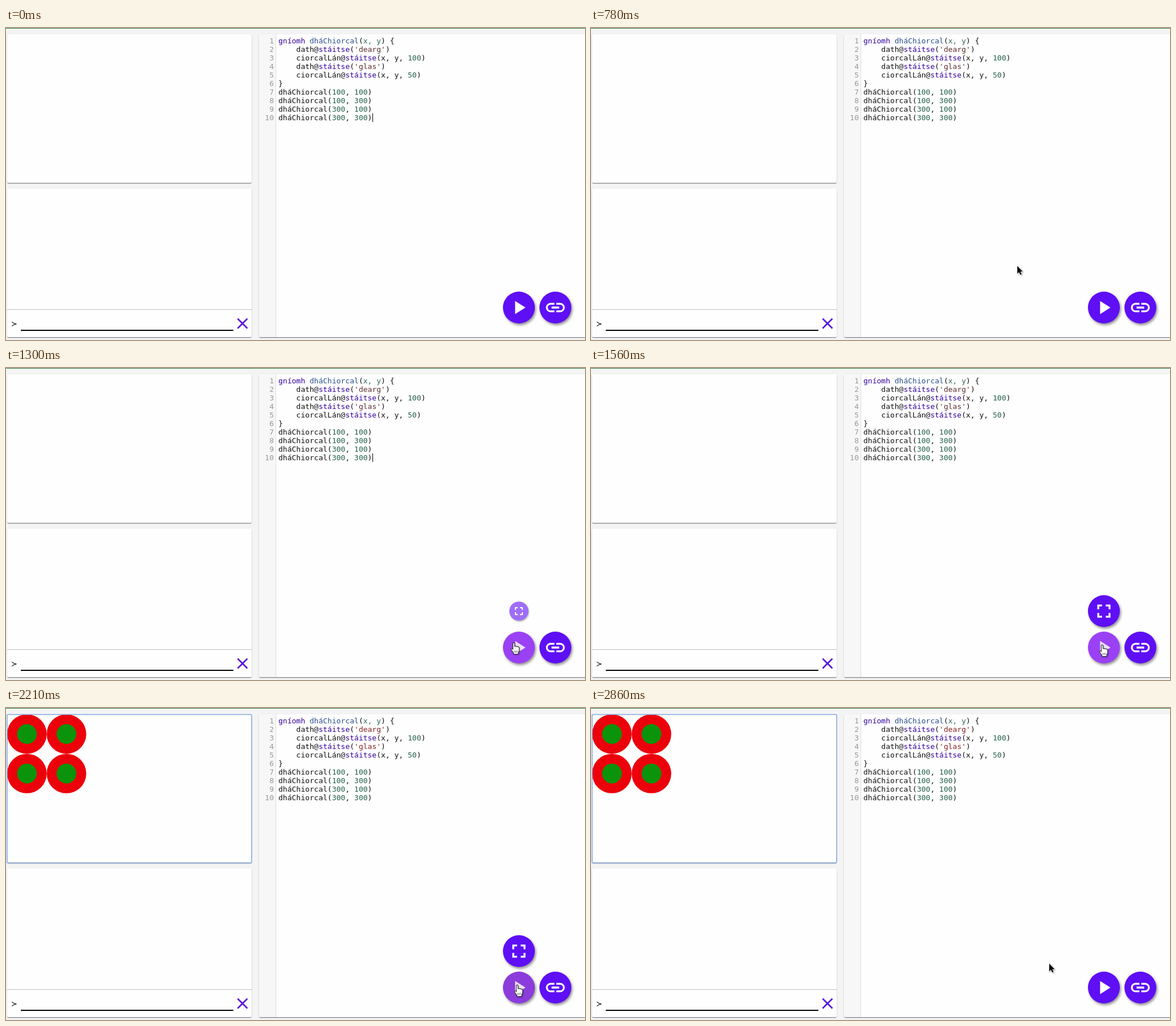
Write an HTML page that moves like this. It is 1016 by 548 pixels and loops after 3120 ms.

```html
<!DOCTYPE html>
<html lang="ga">
<head>
<meta charset="utf-8">
<title>Dhá chiorcal</title>
<style>
  html, body { margin: 0; width: 100%; height: 100%; overflow: hidden; }
  body { position: relative; background: #f4f4f4; }
  body > * { position: absolute; }
  .bar { left: 0; top: 0; width: 100%; height: 1px; background: #2e8037; }
  .panel {
    box-sizing: border-box; background: #fefefe; border-radius: 2px;
    box-shadow: 0 2px 1px -1px rgba(0,0,0,.32), 0 1px 1px rgba(0,0,0,.2), 0 1px 3px rgba(0,0,0,.14);
  }
  .stage { left: 2px; top: 11px; width: 429px; height: 261px; }
  .console { left: 2px; top: 282px; width: 429px; height: 261px; }
  .editor { left: 444px; top: 11px; width: 576px; height: 532px; overflow: hidden; }
  .gutter {
    position: absolute; left: 0; top: 0; width: 29px; height: 100%;
    background: #f7f7f7; border-right: 1px solid #ddd;
  }
  pre { margin: 0; position: absolute; top: 4px; font: 13px/15px "DejaVu Sans Mono", monospace; color: #111; }
  .nums { right: 3px; text-align: right; color: #999; }
  .code { left: 34px; }
  .kw { color: #33009c; }
  .def { color: #2a4f8c; }
  .arg { color: #35695f; }
  .num { color: #27604e; }
  .str { color: #5e2d30; }
  .ran .str { color: #86211f; }
  .caret { left: 643px; top: 150px; width: 1px; height: 15px; background: #000; }
  .prompt { left: 9px; top: 512px; font: 13px/16px "DejaVu Sans", sans-serif; color: #000; }
  svg { left: 0; top: 0; }
  .btn { filter: drop-shadow(2px 3px 2px rgba(0,0,0,.42)); }
  .btn circle { fill: #5f0ff5; }
  .btn path { fill: #fff; }
  .btn.hover circle { fill: #9b41f5; }
  .btn.press circle { fill: #8b3cdb; }
  .btn.hover path, .btn.press path { fill: #eee2fb; }
  .pointer { filter: drop-shadow(1px 1px 1px rgba(0,0,0,.35)); }
</style>
</head>
<body>
<div class="bar"></div>
<div class="panel stage"></div>
<div class="panel console"></div>
<div class="panel editor">
  <div class="gutter"><pre class="nums">1
2
3
4
5
6
7
8
9
10</pre></div>
  <pre class="code"><span class="kw">gníomh</span> <span class="def">dháChiorcal</span>(<span class="arg">x, y</span>) {
    dath@<span class="kw">stáitse</span>(<span class="str">'dearg'</span>)
    ciorcalLán@<span class="kw">stáitse</span>(x, y, <span class="num">100</span>)
    dath@<span class="kw">stáitse</span>(<span class="str">'glas'</span>)
    ciorcalLán@<span class="kw">stáitse</span>(x, y, <span class="num">50</span>)
}
dháChiorcal(<span class="num">100</span>, <span class="num">100</span>)
dháChiorcal(<span class="num">100</span>, <span class="num">300</span>)
dháChiorcal(<span class="num">300</span>, <span class="num">100</span>)
dháChiorcal(<span class="num">300</span>, <span class="num">300</span>)</pre>
</div>
<div class="caret" id="caret"></div>
<div class="prompt">≻</div>

<svg width="1016" height="548" viewBox="0 0 1016 548">
  <defs>
    <g id="target">
      <circle r="100" fill="#ec000b"/>
      <circle r="50" fill="#0b930b"/>
    </g>
  </defs>

  <path d="M2 494.5H431" stroke="#bdbdbd"/>
  <path d="M26 531H399" stroke="#000" stroke-width="2"/>
  <path d="M406.5 510.500l17 17m0-17l-17 17" stroke="#560fdc" stroke-width="2.600"/>

  <g id="drawing">
    <g transform="translate(2 11) scale(.347)">
      <use href="#target" x="100" y="100"/>
      <use href="#target" x="100" y="300"/>
      <use href="#target" x="300" y="100"/>
      <use href="#target" x="300" y="300"/>
    </g>
    <rect x="2" y="11.500" width="429" height="260.500" rx="1.500" fill="none" stroke="#84a8e2" stroke-width="1.500"/>
  </g>

  <g class="btn" id="full">
    <circle r="28"/>
    <path transform="scale(1.65) translate(-12 -12)" d="M7 14H5v5h5v-2H7v-3zm-2-4h2V7h3V5H5v5zm12 7h-3v2h5v-5h-2v3zM14 5v2h3v3h2V5h-5z"/>
  </g>
  <g class="btn" id="play" transform="translate(900 491)">
    <circle r="28"/>
    <path transform="scale(1.65) translate(-12 -12)" d="M8 5v14l11-7z"/>
  </g>
  <g class="btn" transform="translate(964 491)">
    <circle r="28"/>
    <path transform="scale(1.65) translate(-12 -12)" d="M3.900 12c0-1.710 1.390-3.100 3.100-3.100h4V7H7c-2.760 0-5 2.240-5 5s2.240 5 5 5h4v-1.900H7c-1.710 0-3.100-1.390-3.100-3.100zM8 13h8v-2H8v2zm9-6h-4v1.900h4c1.710 0 3.100 1.390 3.100 3.100s-1.390 3.100-3.100 3.100h-4V17h4c2.760 0 5-2.240 5-5s-2.240-5-5-5z"/>
  </g>

  <g class="pointer" id="arrow">
    <path d="M0 0V13.500L3.100 10.700L5.300 15.600L7.600 14.600L5.500 9.800H9.600Z" fill="#0a0a0a" stroke="#fff" stroke-width="1.200" paint-order="stroke"/>
  </g>
  <g class="pointer" id="hand">
    <path d="M-1.500 1.500Q0-.8 1.500 1.500V7Q3 5.800 4.200 7.300Q5.800 6.200 6.800 7.800Q8.600 7 9.500 9V14.500L8 18V20.500H-.5V18.300L-4.300 13Q-5.200 10.300-3 10.800L-1.500 12.200Z" fill="#fafafa" stroke="#333" stroke-width="1.100" stroke-linejoin="round"/>
    <path d="M1.200 14.500V18M3.600 14.500V18M6 14.500V18" stroke="#555" stroke-width=".9"/>
  </g>
</svg>

<script>
  const LOOP = 3120, STEP = 130;
  const $ = id => document.getElementById(id);
  const show = (id, on) => { $(id).style.display = on ? '' : 'none'; };
  const move = (id, x, y, s = 1) => $(id).setAttribute('transform', `translate(${x} ${y}) scale(${s})`);
  const within = (t, a, b) => t >= a && t < b;

  // Pointer stops: time, x, y
  const stops = [
    [390, 651, 378], [520, 660, 383], [650, 694, 396], [780, 748, 418],
    [910, 804, 437], [1040, 848, 449], [1170, 874, 468], [1300, 891, 482],
    [1430, 897, 486], [2210, 897, 486], [2340, 885, 484], [2470, 870, 480],
    [2600, 843, 467], [2730, 817, 454], [2860, 804, 449]
  ];

  function pointerAt(t) {
    const i = stops.findIndex(s => s[0] > t);
    if (i < 0) return stops[stops.length - 1].slice(1);
    if (i === 0) return null;
    const [t0, x0, y0] = stops[i - 1], [t1, x1, y1] = stops[i];
    const k = (t - t0) / (t1 - t0);
    return [x0 + (x1 - x0) * k, y0 + (y1 - y0) * k];
  }

  // The small button grows in on hover and shrinks away afterwards
  function fullScale(t) {
    if (t < 1300 || t >= 2730) return 0;
    if (t < 1430) return .6;
    return t < 2600 ? 1 : .7;
  }

  function draw(t) {
    const over = within(t, 1300, 2470), ran = t >= 1820;
    const pos = pointerAt(t), size = fullScale(t);

    show('caret', t < 520 || within(t, 1040, 1560));
    show('drawing', ran);
    document.body.classList.toggle('ran', ran);

    show('full', size > 0);
    move('full', 900, 427, size);
    $('full').style.opacity = size;
    $('play').classList.toggle('hover', over && !ran);
    $('play').classList.toggle('press', over && ran);

    show('arrow', pos && !over);
    show('hand', pos && over);
    if (pos) move(over ? 'hand' : 'arrow', ...pos);
  }

  const start = performance.now();
  function tick() {
    const t = (performance.now() - start) % LOOP;
    draw(Math.floor(t / STEP) * STEP);
    requestAnimationFrame(tick);
  }
  tick();
</script>
</body>
</html>
```
